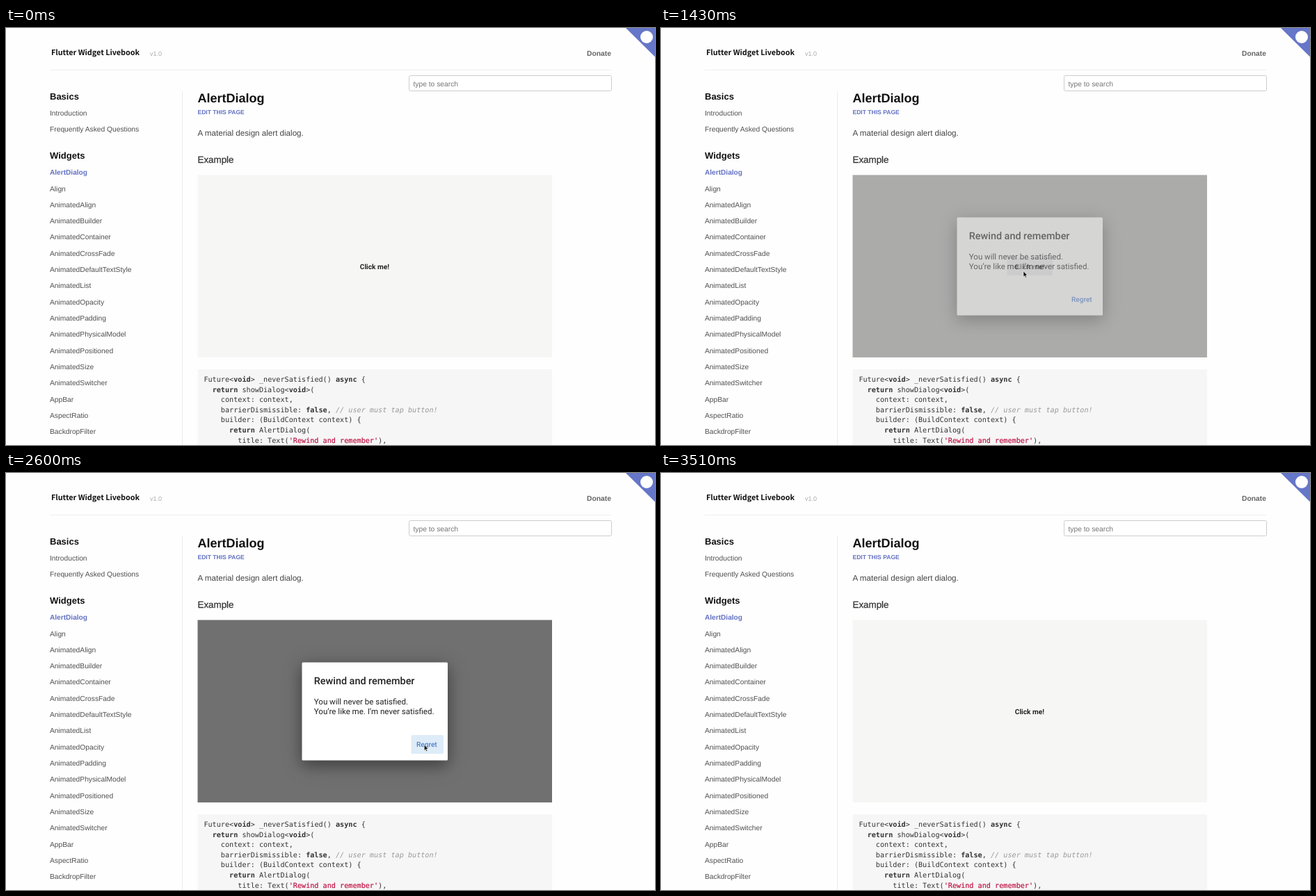
Recreate the animation shown at these times as an HTML page. Size 933x600 px, loop 4550 ms.

```html
<!DOCTYPE html>
<html lang="en">
<head>
<meta charset="utf-8">
<title>AlertDialog</title>
<style>
html, body { margin: 0; width: 100%; height: 100%; overflow: hidden; background: #fefefe; }
svg { display: block; width: 933px; height: 600px; }
text { font-family: "Liberation Sans", Arial, sans-serif; text-rendering: geometricPrecision; white-space: pre; }
.b { font-weight: 700; }
.brand { font: 700 10.8px "Noto Sans CJK JP", "Noto Sans CJK", "Noto Sans", sans-serif; }
.head { font-size: 13px; font-weight: 700; fill: #111; }
.nav { font-size: 10.25px; fill: #505050; }
.on { font-size: 10.12px; font-weight: 700; fill: #6371c3; }
.r { font-family: Roboto, sans-serif; fill: #222; }
.m { font-weight: 500; }
.code { font: 10.17px "DejaVu Sans Mono", monospace; fill: #333; }
.str { fill: #c01546; stroke: #c01546; stroke-width: .2px; }
.com { fill: #999; font-style: italic; }
#card { filter: drop-shadow(0 8px 10px rgba(0,0,0,.28)) drop-shadow(0 3px 14px rgba(0,0,0,.22)); }
</style>
</head>
<body>
<svg viewBox="0 0 933 600">
  <rect width="933" height="600" fill="#fefefe"/>
  <path d="M891 0H933V41.5Z" fill="#6676c8"/>
  <circle cx="921" cy="13" r="9" fill="#fff"/>
  <path d="M63 60.5H870" stroke="#eee"/>
  <path d="M253.5 91V600" stroke="#ebebeb"/>

  <text class="brand" x="65" y="39.2" fill="#111">Flutter Widget Livebook</text>
  <text x="207" y="40" font-size="9" fill="#aaa">v1.0</text>
  <text class="b" x="835" y="40" font-size="10.3" fill="#666">Donate</text>
  <rect x="579.5" y="68.5" width="291" height="22" rx="2" fill="#fff" stroke="#ccc"/>
  <text x="585.5" y="83.6" font-size="10.27" fill="#757575">type to search</text>

  <text class="head" x="63" y="102.5">Basics</text>
  <text class="head" x="63" y="188">Widgets</text>
  <g id="nav"></g>

  <text class="b" x="275.5" y="107" font-size="18" fill="#111">AlertDialog</text>
  <text class="b" x="275.5" y="123.6" font-size="8.56" fill="#6371c3">EDIT THIS PAGE</text>
  <text x="275.5" y="155" font-size="11.62" fill="#444">A material design alert dialog.</text>
  <text x="275.5" y="194.3" font-size="13.37" fill="#333" stroke="#333" stroke-width=".25">Example</text>

  <rect x="275.5" y="211.5" width="509.5" height="262.5" rx="1" fill="#f6f6f5"/>
  <rect id="hover" x="497.5" y="330" width="65.5" height="26" rx="1"/>
  <text class="r b" x="508.8" y="346.7" font-size="10.1">Click me!</text>
  <rect id="shade" x="275.5" y="211.5" width="509.5" height="262.5"/>
  <g id="dialog">
    <rect id="card" x="425.5" y="272.5" width="209.5" height="141" rx="1.5" fill="#fff"/>
    <text class="r m" x="442.8" y="303.7" font-size="14.4">Rewind and remember</text>
    <text class="r" x="442.8" y="332.7" font-size="11.52">You will never be satisfied.</text>
    <text class="r" x="442.8" y="346.7" font-size="11.52">You’re like me. I’m never satisfied.</text>
    <rect id="press" x="582.5" y="377" width="46.5" height="27" rx="1.5"/>
    <text class="r m" x="590" y="394.2" font-size="10.1" style="fill:#4d7ecb">Regret</text>
  </g>

  <rect x="275.5" y="491" width="509.5" height="120" rx="1" fill="#f6f6f6"/>
  <g id="code"></g>
  <path id="cursor" d="M0 0V8.4L1.9 6.7 3.2 9.6 4.6 9 3.3 6.1H5.8Z" fill="#111" stroke="#fff" stroke-width=".6"/>
</svg>
<script>
const $ = id => document.getElementById(id);
const LOOP = 4550, STEP = 130;

const item = (name, y) => `<text class="nav" x="63" y="${y}">${name}</text>`;
const basics = ['Introduction', 'Frequently Asked Questions'];
const widgets = ('AlertDialog Align AnimatedAlign AnimatedBuilder AnimatedContainer AnimatedCrossFade ' +
  'AnimatedDefaultTextStyle AnimatedList AnimatedOpacity AnimatedPadding AnimatedPhysicalModel ' +
  'AnimatedPositioned AnimatedSize AnimatedSwitcher AppBar AspectRatio BackdropFilter').split(' ');
$('nav').innerHTML = basics.map((n, i) => item(n, 125.7 + i * 23.33)).join('') +
  widgets.map((n, i) => item(n, 211.2 + i * 23.32)).join('');
$('nav').children[basics.length].classList.add('on');

const source = `Future<void> _neverSatisfied() async {
  return showDialog<void>(
    context: context,
    barrierDismissible: false, // user must tap button!
    builder: (BuildContext context) {
      return AlertDialog(
        title: Text('Rewind and remember'),`;
const span = (cls, s) => `<tspan class="${cls}">${s}</tspan>`;
const paint = line => line.replace(/</g, '&lt;').replace(/>/g, '&gt;')
  .replace(/\/\/.*|'[^']*'|\b(void|async|return|false)\b/g,
    s => span(s[0] === '/' ? 'com' : s[0] === "'" ? 'str' : 'b', s));
$('code').innerHTML = source.split('\n').map((line, i) =>
  `<text class="code" x="284.4" y="${509.1 + i * 14.57}">${paint(line)}</text>`).join('');

const START = [650, 460], BUTTON = [521, 349.8], REGRET = [601.2, 391], END = [720, 500];
const clamp = v => Math.min(1, Math.max(0, v));
const smooth = p => p * p * (3 - 2 * p);
const mix = (a, b, p) => a.map((v, i) => v + (b[i] - v) * p);

function pointer(t) {
  if (t < 2080) return mix(START, BUTTON, smooth(clamp((t - 650) / 520)));
  if (t < 3250) return mix(BUTTON, REGRET, smooth(clamp((t - 1950) / 520)));
  return mix(REGRET, END, (t - 3120) / 390);
}

// Opacity of the barrier and of the dialog
function fade(t) {
  if (t < 1430 || t >= 2860) return [0, 0];
  if (t < 1560) return [.306, .5];
  return t < 2730 ? [.54, 1] : [.18, .32];
}

function draw(now) {
  const t = Math.floor(now % LOOP / STEP) * STEP;
  const [shade, dialog] = fade(t);
  const [x, y] = pointer(t);
  $('shade').setAttribute('opacity', shade);
  $('dialog').setAttribute('opacity', dialog);
  $('hover').setAttribute('fill', t < 1170 || t >= 1560 ? 'none' : t < 1300 ? '#e6e6e6' : '#dedede');
  $('press').setAttribute('fill', t < 2470 || t >= 2860 ? 'none' : t < 2600 ? '#ecf4fb' : '#deecf8');
  $('cursor').setAttribute('transform', `translate(${x} ${y})`);
  $('cursor').setAttribute('visibility', t >= 650 && t < 3510 ? 'visible' : 'hidden');
}

const origin = performance.now();
function tick() {
  draw(performance.now() - origin);
  requestAnimationFrame(tick);
}
tick();
</script>
</body>
</html>
```
